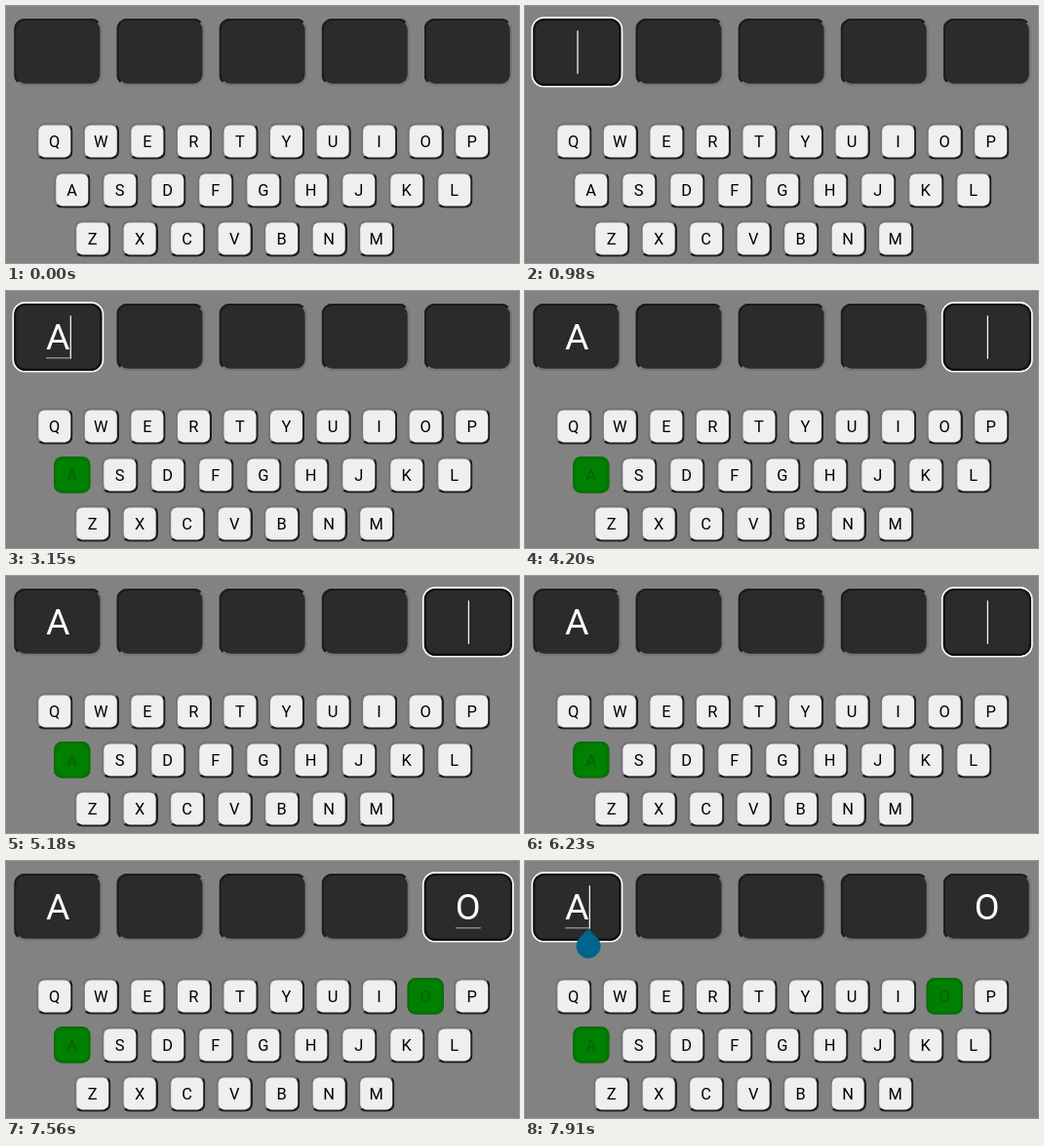
These frames come from a looping animation (526x264 px, 8000 ms). An HTML page:

```html
<!DOCTYPE html>
<html lang="en">
<head>
<meta charset="utf-8">
<title>Letter boxes</title>
<style>
  html, body { margin: 0; width: 100%; height: 100%; overflow: hidden; background: #828282; }
  /* zoom and scale cancel out, which keeps fractional edges smooth */
  #stage {
    position: absolute; left: 0; top: 0; width: 526px; height: 264px; overflow: hidden;
    zoom: 10; transform: scale(.1); transform-origin: 0 0; font-family: Roboto, sans-serif;
  }
  #stage div { position: absolute; box-sizing: border-box; text-align: center; }
  .slot {
    top: 12.7px; width: 90.6px; height: 69.3px; border: 2.3px solid; border-radius: 11.5px;
    border-color: #1c1c1c #767676 #767676 #1c1c1c;
    background: #2b2b2b; color: #fff; font-size: 37.7px; line-height: 64.7px;
  }
  .slot.focus { border-color: #101010; outline: 1.6px solid #fff; }
  .key {
    width: 37.6px; height: 37.6px; border: 2.3px solid; border-radius: 8.5px;
    border-color: #767676 #1e1e1e #1e1e1e #767676;
    background: #efefef; color: #000; font-size: 16.5px; line-height: 33px;
  }
  .key.used { background: #008000; border-color: #086e08; color: #0a5f0a; }
  #caret { top: 25.3px; width: 1.2px; height: 44.4px; background: #fff; }
  #line { top: 68.2px; height: 1.2px; background: #a0a0a0; }
  #handle {
    left: 52.5px; top: 75px; width: 25px; height: 25px; background: #00658e;
    border-radius: 0 50% 50% 50%; transform: rotate(45deg);
  }
</style>
</head>
<body>
<div id="stage"></div>
<script>
const LOOP = 8000, BLINK = 490, HANDLE_AT = 7910;
const SLOT_X = 8.1, SLOT_PITCH = 105.1, SLOT_W = 90.6, KEY = 37.6;
const LETTER_W = { A: 24.6, O: 25.9 };
const stage = document.getElementById('stage');

function add(id, cls, left, text = '') {
  const el = document.createElement('div');
  if (id) el.id = id;
  if (cls) el.className = cls;
  if (left !== null) el.style.left = left + 'px';
  el.textContent = text;
  stage.append(el);
  return el;
}

const slots = Array.from({ length: 5 }, (_, i) => add('', 'slot', SLOT_X + i * SLOT_PITCH));

// letters, first centre x, pitch, centre y
const rows = [
  ['QWERTYUIOP', 49.75, 47.55, 138.9],
  ['ASDFGHJKL', 67.75, 49, 188.9],
  ['ZXCVBNM', 88.7, 48.5, 238.9]
];
const keys = {};
for (const [letters, x, pitch, y] of rows) {
  [...letters].forEach((ch, i) => {
    keys[ch] = add('', 'key', x + i * pitch - KEY / 2, ch);
    keys[ch].style.top = y - KEY / 2 + 'px';
  });
}

const caret = add('caret', '', null);
const line = add('line', '', null);
const handle = add('handle', '', null);

// Each step restarts the caret blink.
const steps = [
  { at: 0, slot: -1 },
  { at: 980, slot: 0 },
  { at: 2170, slot: 0, ch: 'A' },
  { at: 3220, slot: 4 },
  { at: 6230, slot: 4 },
  { at: 6930, slot: 4, ch: 'O' },
  { at: 7840, slot: 0, ch: 'A' }
];
const typed = [
  { at: 2170, slot: 0, ch: 'A' },
  { at: 6930, slot: 4, ch: 'O' }
];

function show(el, on) { el.style.visibility = on ? 'visible' : 'hidden'; }

function draw(t) {
  const step = steps.filter(s => s.at <= t).pop();
  slots.forEach((el, i) => el.classList.toggle('focus', i === step.slot));
  for (const { at, slot, ch } of typed) {
    slots[slot].textContent = t >= at ? ch : '';
    keys[ch].classList.toggle('used', t >= at);
  }
  const mid = SLOT_X + step.slot * SLOT_PITCH + SLOT_W / 2;
  const w = LETTER_W[step.ch] || 0;
  caret.style.left = mid + w / 2 + 'px';
  line.style.left = mid - w / 2 + 'px';
  line.style.width = w + 'px';
  show(caret, step.slot >= 0 && Math.floor((t - step.at) / BLINK) % 2 === 0);
  show(line, w > 0);
  show(handle, t >= HANDLE_AT);
}

const start = performance.now();
function tick(now) {
  draw(Math.max(0, now - start) % LOOP);
  requestAnimationFrame(tick);
}
draw(0);
requestAnimationFrame(tick);
</script>
</body>
</html>
```
